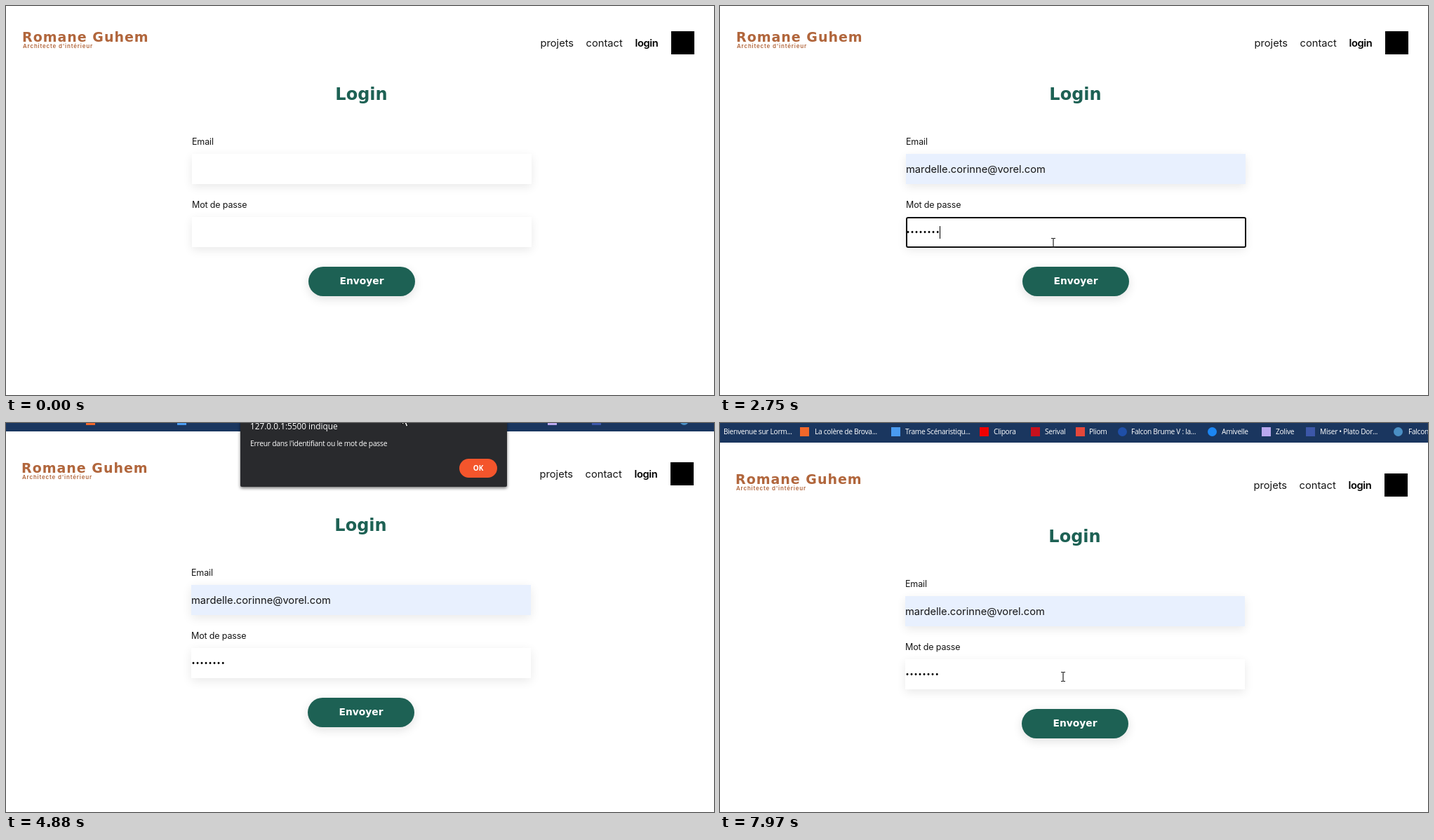
An HTML page that plays this animation: 1009x555 px, repeating every 8000 ms.

```html
<!DOCTYPE html>
<html lang="fr">
<head>
<meta charset="utf-8">
<title>Login</title>
<style>
  html, body { margin: 0; width: 100%; height: 100%; overflow: hidden; background: #fff; }
  body { position: relative; font-family: Inter, sans-serif; color: #161616; }
  .at, .at * { box-sizing: border-box; }
  .at { position: absolute; left: calc(var(--x) * 1px); top: calc(var(--y) * 1px); }
  /* one text line, --y is its middle */
  .line { margin-top: -10px; line-height: 20px; white-space: pre; }
  .mid { transform: translateX(-50%); }
  .loop, .cut { animation: var(--a) 8s linear infinite both; }
  .cut { animation-timing-function: step-end; }

  #page { position: absolute; inset: 0; animation: pan 8s linear infinite, nudge 8s step-end infinite; }
  .wide { font-family: "DejaVu Sans", sans-serif; font-weight: 700; }
  .brand { color: #b1663c; }
  .name { font-size: 19px; letter-spacing: 1px; }
  .tag { font-size: 8px; font-weight: 600; letter-spacing: .8px; }
  .nav { font-size: 14.7px; }
  .here { font-weight: 600; letter-spacing: -.4px; color: #000; }
  h1 { margin: 0; font-size: 24px; color: #1d6154; }
  .label { font-size: 12.5px; letter-spacing: -.15px; }
  .field { width: 484px; height: 43px; background: #fff; box-shadow: 0 4px 14px rgba(0, 0, 0, .09); }
  .ring { position: absolute; inset: 0 -.5px -1px 0; border: 2px solid #101010; border-radius: 3px; }
  .entry { position: absolute; left: 0; top: 13px; height: 18px; line-height: 18px; overflow: hidden;
    white-space: pre; border-right: 1px solid transparent; }
  .mail { font-size: 14.7px; --a: fill; animation: fill 8s step-end infinite, mailcaret 8s step-end infinite; }
  .pass { font: 10px/18px "DejaVu Sans Mono", monospace; color: #000; box-sizing: content-box !important;
    animation: type 8s step-end infinite, passcaret 8s step-end infinite; }
  .send { width: 152px; height: 42px; border-radius: 21px; background: #1d6154; color: #fff; text-align: center;
    font-size: 13.8px; line-height: 41px; box-shadow: 0 4px 14px rgba(0, 0, 0, .12); }

  .list { width: 168px; height: 185px; padding-top: 3px; border-radius: 2px; background: #3b3b3b; color: #fff;
    box-shadow: 0 1px 4px rgba(0, 0, 0, .4); font: 11px/29.8px "Open Sans", sans-serif; letter-spacing: -.3px; }
  .list::before { content: ""; position: absolute; left: 9px; top: -7px; border: 8px solid transparent;
    border-top: 0; border-bottom: 7px solid #3b3b3b; }
  .list div { padding-left: 10px; height: 29.8px; }
  .list div:first-child { background: #4a4a4a; margin-top: -3px; padding-top: 3px; height: 32.8px; }

  .bar { width: 1012px; height: 52px; background: #1a365f; }
  .mark { font: 10.2px/20px "Open Sans", sans-serif; letter-spacing: -.3px; color: #fff; }
  .ico { width: 13px; height: 13px; margin-top: -6.5px; background: var(--c); }
  .o { border-radius: 50%; }

  .box { width: 380px; height: 131px; border-radius: 2px; color: #fff; font-family: "Open Sans", sans-serif;
    box-shadow: 0 2px 4px rgba(0, 0, 0, .55); animation: alert 8s linear infinite, shade 8s step-end infinite; }
  .host { font-size: 11.8px; }
  .msg { font-size: 10.3px; letter-spacing: -.25px; }
  .ok { width: 54px; height: 27px; border-radius: 14px; text-align: center; font-size: 10px; font-weight: 700;
    line-height: 26px; }

  #cursor { position: absolute; left: 0; top: 0; animation: move 8s linear infinite; }
  #cursor svg { position: absolute; overflow: visible; left: 0; top: 0; width: 12px; height: 19px; }

  @keyframes pan {
    0%, 55.625% { transform: translate(0, 0); animation-timing-function: ease-in-out; }
    65.75%, 100% { transform: translate(0, 36px); }
  }
  @keyframes nudge { 0% { left: 0; right: 0; } 55.625%, 100% { left: -1px; right: 1px; } }
  @keyframes mailring { 0% { opacity: 0; } 9.375% { opacity: 1; } 21%, 100% { opacity: 0; } }
  @keyframes mailcaret { 0% { border-color: transparent; } 9.375% { border-color: #000; } 21%, 100% { border-color: transparent; } }
  @keyframes fill { 0% { max-width: 1px; } 14.375%, 100% { max-width: 300px; } }
  @keyframes tint { 0% { background: #fff; } 14.375%, 100% { background: #e8f0fe; } }
  @keyframes passring { 0% { opacity: 0; } 21% { opacity: 1; } 43.25%, 100% { opacity: 0; } }
  @keyframes passcaret { 0% { border-color: transparent; } 21% { border-color: #000; } 40.75%, 100% { border-color: transparent; } }
  @keyframes type {
    0% { width: 0; } 27.25% { width: 1ch; } 27.875% { width: 2ch; } 28.5% { width: 3ch; }
    30.25% { width: 4ch; } 32% { width: 5ch; } 33.125% { width: 6ch; } 34.375%, 100% { width: 8ch; }
  }
  @keyframes list {
    0%, 11.875% { opacity: 0; } 12.75%, 16.875% { opacity: 1; }
    17.625% { opacity: .6; } 18.75%, 100% { opacity: 0; }
  }
  @keyframes alert {
    0%, 44% { opacity: 0; transform: translateY(-14px); }
    45.875% { opacity: .97; transform: translateY(-3.5px); }
    47%, 93.5% { opacity: 1; transform: none; }
    94.5%, 100% { opacity: 0; transform: none; }
  }
  @keyframes shade { 0% { background: #303135; } 55.625%, 100% { background: #292a2d; } }
  @keyframes okay {
    0% { background: #ff5a2b; box-shadow: 0 0 0 2px #8a4630; }
    55.625%, 100% { background: #f4552c; box-shadow: none; }
  }
  @keyframes move {
    0%, 1.2% { transform: translate(930px, 600px); }
    1.25% { transform: translate(913px, 531px); animation-timing-function: ease-in-out; }
    9%, 11.875% { transform: translate(480px, 236px); animation-timing-function: ease-in-out; }
    15.625%, 18.75% { transform: translate(474px, 279px); animation-timing-function: ease-in-out; }
    21%, 36.25% { transform: translate(475px, 338px); animation-timing-function: ease-in-out; }
    41.125%, 43.25% { transform: translate(535px, 390px); }
    45.875% { transform: translate(536px, 420px); }
    47%, 49% { transform: translate(617px, 490px); animation-timing-function: ease-in-out; }
    52.75%, 55.625% { transform: translate(564px, -24px); }
    61% { transform: translate(564px, -13px); animation-timing-function: ease-out; }
    65.75%, 88% { transform: translate(564px, 24px); animation-timing-function: ease-in-out; }
    92%, 93.5% { transform: translate(665px, 78px); animation-timing-function: ease-in-out; }
    98% { transform: translate(574px, 307px); animation-timing-function: ease-out; }
    99.625%, 100% { transform: translate(489px, 362px); }
  }
  @keyframes arrow {
    0% { opacity: 1; } 7% { opacity: 0; } 12.5% { opacity: 1; } 20% { opacity: 0; }
    37.5% { opacity: 1; } 98.75%, 100% { opacity: 0; }
  }
  @keyframes beam {
    0% { opacity: 0; } 7% { opacity: 1; } 12.5% { opacity: 0; } 20% { opacity: 1; }
    37.5% { opacity: 0; } 98.75%, 100% { opacity: 1; }
  }
</style>
</head>
<body>
<div id="page">
  <div class="at bar" style="--x:-1;--y:-60"></div>
  <span class="at line mark" style="--x:6;--y:-24">Bienvenue sur Lorm...</span>
  <i class="at ico" style="--x:115;--y:-24;--c:#f2672a"></i>
  <span class="at line mark" style="--x:136;--y:-24">La colère de Brova...</span>
  <i class="at ico" style="--x:245;--y:-24;--c:#4a9bf0"></i>
  <span class="at line mark" style="--x:265;--y:-24">Trame Scénaristiqu...</span>
  <i class="at ico" style="--x:371;--y:-24;--c:#f00000"></i>
  <span class="at line mark" style="--x:391;--y:-24">Clipora</span>
  <i class="at ico" style="--x:444;--y:-24;--c:#c8101c"></i>
  <span class="at line mark" style="--x:464;--y:-24">Serival</span>
  <i class="at ico" style="--x:508;--y:-24;--c:#e5473a"></i>
  <span class="at line mark" style="--x:527;--y:-24">Pliom</span>
  <i class="at ico o" style="--x:568;--y:-24;--c:#1f4fa8"></i>
  <span class="at line mark" style="--x:587;--y:-24">Falcon Brume V : la...</span>
  <i class="at ico o" style="--x:696;--y:-24;--c:#1c86f2"></i>
  <span class="at line mark" style="--x:716;--y:-24">Amivelle</span>
  <i class="at ico" style="--x:773;--y:-24;--c:#b9a8ee"></i>
  <span class="at line mark" style="--x:793;--y:-24">Zolive</span>
  <i class="at ico" style="--x:836;--y:-24;--c:#3c57a8"></i>
  <span class="at line mark" style="--x:856;--y:-24">Miser • Plato Dor...</span>
  <i class="at ico o" style="--x:961;--y:-24;--c:#4a8fc4"></i>
  <span class="at line mark" style="--x:982;--y:-24">Falcon</span>

  <span class="at line wide brand name" style="--x:23;--y:43.5">Romane Guhem</span>
  <span class="at line brand tag" style="--x:24;--y:57">Architecte d'intérieur</span>
  <span class="at line nav" style="--x:761.5;--y:52.5">projets</span>
  <span class="at line nav" style="--x:826.5;--y:52.5">contact</span>
  <span class="at line nav here" style="--x:896.5;--y:52.5">login</span>
  <i class="at" style="--x:948;--y:35.5;width:33px;height:33px;background:#000"></i>

  <h1 class="at line wide mid" style="--x:506.5;--y:126">Login</h1>
  <span class="at line label" style="--x:265;--y:194">Email</span>
  <div class="at field cut" style="--x:265;--y:211;--a:tint">
    <span class="entry mail">mardelle.corinne@vorel.com</span>
    <i class="ring cut" style="--a:mailring"></i>
  </div>
  <span class="at line label" style="--x:265;--y:283.5">Mot de passe</span>
  <div class="at field" style="--x:265;--y:301">
    <span class="entry pass">••••••••</span>
    <i class="ring cut" style="--a:passring"></i>
  </div>
  <div class="at wide send" style="--x:431;--y:372">Envoyer</div>

  <div class="at list loop" style="--x:351;--y:264;--a:list">
    <div>mardelle.corinne@vorel.com</div>
    <div>romane.guhem@test.tld</div>
    <div>plumibelle@vorel.com</div>
    <div>mardelle.fanny@vorel.com</div>
    <div>coraplumette@vorel.com</div>
    <div>corapluminette@vorel.com</div>
  </div>

  <div class="at box" style="--x:335;--y:-60">
    <span class="at line host" style="--x:14;--y:44">127.0.0.1:5500 indique</span>
    <span class="at line msg" style="--x:14;--y:69">Erreur dans l'identifiant ou le mot de passe</span>
    <span class="at ok cut" style="--x:312;--y:91;--a:okay">OK</span>
  </div>
</div>

<div id="cursor">
  <svg class="cut" style="--a:arrow">
    <path d="M.5.5V15.5L4 12.2 6.4 18 8.8 17 6.4 11.5H11.2Z" fill="#fff" stroke="#111"/>
  </svg>
  <svg class="cut" style="--a:beam">
    <path d="M-3-6.5H-1L0-6 1-6.5H3M0-6V6M-3 6.5H-1L0 6 1 6.5H3" fill="none" stroke="#222" stroke-width="1.2"/>
  </svg>
</div>
</body>
</html>
```
